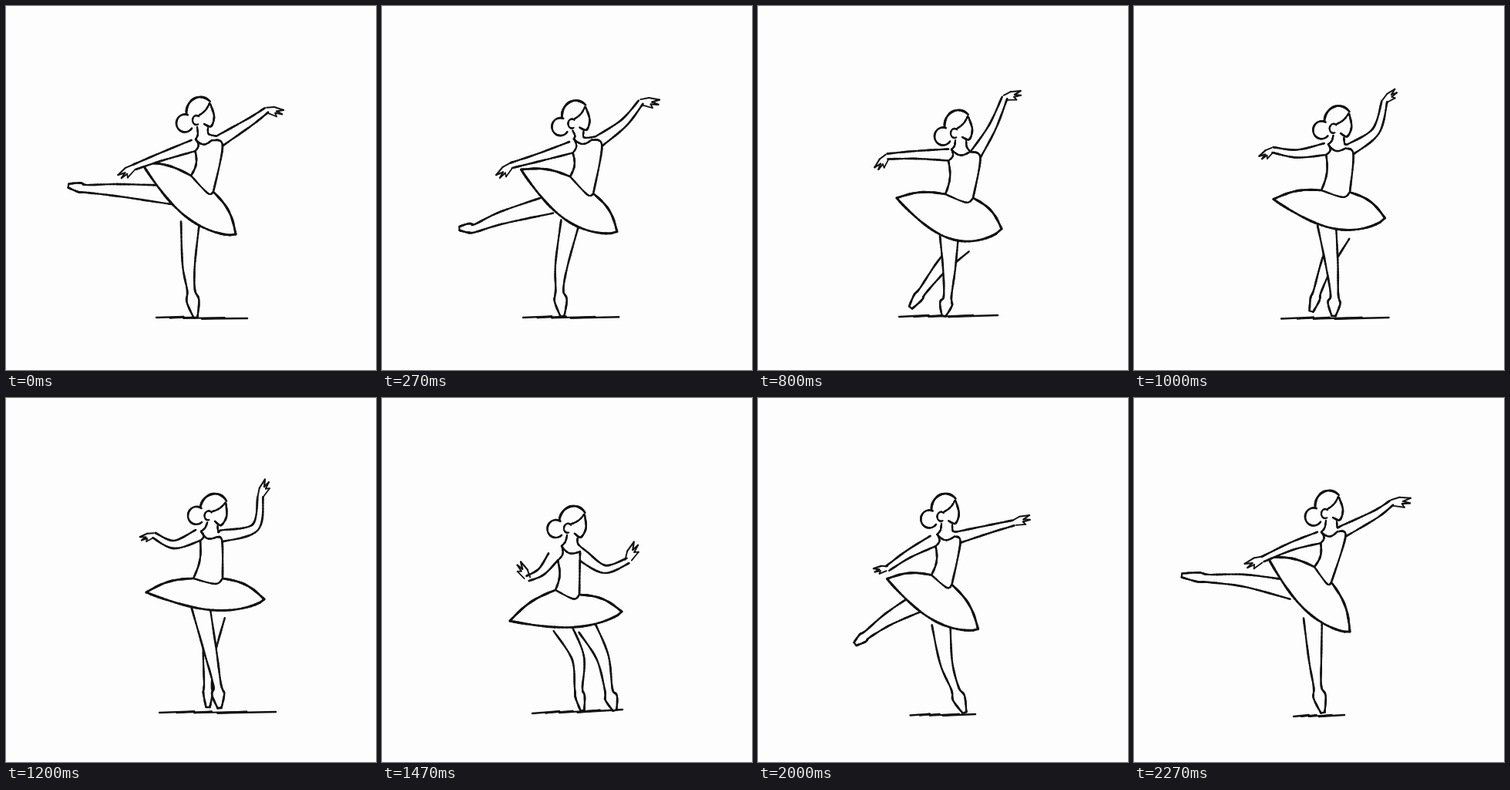
An HTML page with a canvas that plays this animation: 480x472 px, repeating every 2.34 s.

```html
<!DOCTYPE html>
<html lang="en">
<head>
<meta charset="utf-8">
<title>Ballet turn</title>
<style>
html, body { margin: 0; width: 100%; height: 100%; overflow: hidden; background: #fdfdfd; }
canvas { display: block; }
</style>
</head>
<body>
<canvas id="stage" width="480" height="472"></canvas>
<script>
const ctx = document.getElementById('stage').getContext('2d');
const PAPER = '#fdfdfd', INK = '#121212';
const LOOP = 2340, STEP = 1000 / 15;
const keySteps = [0, 7, 12, 18, 22, 26, 34, 35];

// Each joint has one position per key pose.
const keys = text => text.split(' ').map(pair => pair.split(',').map(Number));
const arms = {
  shoulderL: keys('243,181 247,185 247,193 249,178 222,206 214,190 240,181'),
  elbowL: keys('200,196 205,197 205,193 218,190 207,225 185,213 205,192'),
  wristL: keys('166,209 169,205 168,195 192,178 189,234 169,233 167,209'),
  tipL: keys('146,220 151,220 152,210 174,181 179,213 156,228 144,216'),
  shoulderR: keys('277,175 284,176 282,193 279,179 261,205 250,188 271,173'),
  elbowR: keys('317,150 311,153 304,157 323,168 289,222 290,188 313,151'),
  wristR: keys('338,135 334,117 320,119 330,128 319,211 329,188 334,136'),
  tipR: keys('360,136 360,113 341,111 337,106 328,187 346,175 359,131')
};
const legs = {
  hipW: keys('215,245 222,266 265,310 272,283 233,296 206,284 205,249'),
  kneeW: keys('148,239 162,301 238,338 264,328 254,336 194,336 145,237'),
  ankleW: keys('105,237 134,326 214,369 262,370 255,376 187,378 98,234'),
  toeW: keys('81,233 115,330 198,391 262,401 260,405 190,408 62,230'),
  hipS: keys('239,280 248,280 248,298 252,268 266,298 243,301 232,285'),
  kneeS: keys('237,335 230,335 248,340 265,328 286,336 253,345 235,340'),
  ankleS: keys('240,368 223,368 246,376 274,372 294,378 273,379 238,374'),
  toeS: keys('246,404 225,401 241,402 277,402 302,405 291,408 245,408')
};
const body = {
  head: keys('252,138 251,146 260,155 270,144 248,160 233,148 253,140'),
  tilt: keys('0 0 0 15 12 6 0'),
  neckL: keys('246,173 251,172 251,186 253,173 233,192 222,180 243,174'),
  neckR: keys('267,174 276,173 275,189 274,180 257,199 246,186 264,173'),
  waistL: keys('240,220 247,222 243,244 243,234 225,249 216,240 234,219'),
  waistR: keys('269,241 278,245 279,249 281,234 256,255 247,245 256,239')
};
const tutu = {
  left: keys('176,203 184,219 180,249 182,252 166,289 161,262 174,207'),
  right: keys('298,296 310,290 316,289 335,261 311,277 291,296 280,303'),
  sag: keys('21 25 31 18 15 18 18'),
  floorL: keys('195,403 174,403 183,402 199,407 195,408 188,409 207,412'),
  floorR: keys('313,406 303,403 311,402 350,408 312,405 291,410 273,412')
};
const joints = { ...arms, ...legs, ...body, ...tutu };

const mix = (a, b, u) => a.map((v, d) => v + (b[d] - v) * u);
const add = (a, x, y) => [a[0] + x, a[1] + y];
const range = n => Array.from({ length: n + 1 }, (_, i) => i / n);

// Smooth line through points of any dimension.
function curve(pts) {
  const out = [];
  for (let i = 0; i < pts.length - 1; i++) {
    const a = pts[i], b = pts[i + 1], before = pts[i - 1] || a, after = pts[i + 2] || b;
    for (const u of range(12).slice(0, 12)) {
      const v = 1 - u;
      out.push(a.map((p, d) => v * v * (1 + 2 * u) * p + u * u * (3 - 2 * u) * b[d]
        + u * v * (v * (b[d] - before[d]) - u * (after[d] - p)) / 2));
    }
  }
  return [...out, pts[pts.length - 1]];
}

// Line from a to b that bulges to its right; skew moves the bulge towards b.
function bow(a, b, depth, skew = 1, power = 1) {
  const dx = b[0] - a[0], dy = b[1] - a[1], len = Math.hypot(dx, dy);
  return range(28).map(u => {
    const h = depth / len * Math.max(0, Math.sin(Math.PI * u ** skew)) ** power;
    return add(mix(a, b, u), -dy * h, dx * h);
  });
}

function arc(x, y, rx, ry, from, to) {
  return range(24).map(u => {
    const angle = (from + (to - from) * u) * Math.PI / 180;
    return [x + rx * Math.cos(angle), y + ry * Math.sin(angle)];
  });
}

// Both edges of a limb around [x, y, half width] points.
function limb(spine) {
  const mid = curve(spine);
  return [1, -1].map(side => mid.map(([x, y, w], i) => {
    const a = mid[Math.max(0, i - 1)], b = mid[Math.min(mid.length - 1, i + 1)];
    const dx = b[0] - a[0], dy = b[1] - a[1], k = side * w / Math.hypot(dx, dy);
    return [x - dy * k, y + dx * k];
  }));
}

let lineCount = 0;
function ink(pts, width = 2.5) {
  const phase = ++lineCount * 2;
  for (let i = 1; i < pts.length; i++) {
    ctx.lineWidth = width * (1 + .12 * Math.sin(i * .8 + phase));
    ctx.beginPath();
    ctx.moveTo(...pts[i - 1]);
    ctx.lineTo(...pts[i]);
    ctx.stroke();
  }
}

function cover(pts) {
  ctx.beginPath();
  pts.forEach(p => ctx.lineTo(...p));
  ctx.fill();
}

function leg(hip, knee, ankle, toe, heelWidth) {
  const [a, b] = limb([[...hip, 12], [...knee, 8], [...ankle, 5],
    [...mix(ankle, toe, .4), heelWidth], [...toe, 2.5]]);
  const outline = [...a, ...b.reverse()];
  cover(outline);
  ink(outline);
}

// Returns the lower and upper shoulder points.
function arm(shoulder, elbow, wrist, tip, side) {
  const edges = limb([[...shoulder, 7.5], [...elbow, 5], [...wrist, 3.5]]);
  cover([...edges[0], ...edges[1].slice().reverse()]);
  edges.forEach(edge => ink(edge));
  const dx = tip[0] - wrist[0], dy = tip[1] - wrist[1];
  const at = (u, v) => add(wrist, dx * u - dy * v * side, dy * u + dx * v * side);
  ink([at(0, -.15), at(.45, -.2), at(1, -.05), at(.6, .04), at(.92, .2),
    at(.52, .15), at(.6, .35), at(.08, .17)], 2);
  return side > 0 ? [edges[0][0], edges[1][0]] : [edges[1][0], edges[0][0]];
}

function drawHead({ head, tilt, neckL }, shoulderTop) {
  const angle = tilt[0] * Math.PI / 180, c = Math.cos(angle), s = Math.sin(angle);
  const place = pts => pts.map(([x, y]) => add(head, x * c - y * s, x * s + y * c));
  ink(place(arc(0, 0, 18, 20, 172, 315)), 2.9);
  ink(place(bow([12, -12], [-2, 4], -2)), 2.1);
  ink(place(curve([[13, -11], [18, 5], [14, 18], [5, 15]])));
  ink(place(arc(-5, 10, 5, 6, 310, 60)), 2.1);
  ink(place(arc(-20, 14, 11, 11.5, -70, -325)));
  const [nape, throat] = place([[-4, 19], [10, 20]]);
  ink(curve([nape, add(mix(nape, neckL, .6), 2, 0), neckL]), 2.2);
  ink(curve([throat, add(throat, 1, 8), shoulderTop]), 2.2);
}

function draw(ms) {
  const step = Math.min(34, Math.floor((ms % LOOP + 4) / STEP));
  let key = 0;
  while (keySteps[key + 1] <= step) key++;
  const u = (step - keySteps[key]) / (keySteps[key + 1] - keySteps[key]);
  const p = {};
  for (const name in joints) p[name] = mix(joints[name][key], joints[name][(key + 1) % 7], u);

  ctx.fillStyle = PAPER;
  ctx.fillRect(0, 0, 480, 472);
  ctx.strokeStyle = INK;
  ctx.lineCap = ctx.lineJoin = 'round';
  lineCount = 0;

  // Floor scribble runs back and forth.
  ink([0, .3, .15, .45, .3, .75, .5, 1].map((x, i) =>
    add(mix(p.floorL, p.floorR, x), 0, i % 2 ? -1 : 1)), 2.2);
  leg(p.hipW, p.kneeW, p.ankleW, p.toeW, 6);
  leg(p.hipS, p.kneeS, p.ankleS, p.toeS, 8);

  const dip = add(mix(p.waistL, p.waistR, .75), 0, 7);
  const topL = bow(p.left, p.waistL, -5), topR = bow(p.waistR, p.right, -6);
  const hem = bow(p.left, p.right, p.sag[0], 1.3, .7);
  cover([...topL, dip, ...topR, ...hem.slice().reverse()]);
  [topL, topR, hem].forEach(line => ink(line, 2.9));

  const [pitL] = arm(p.shoulderL, p.elbowL, p.wristL, p.tipL, -1);
  const [pitR, topShoulder] = arm(p.shoulderR, p.elbowR, p.wristR, p.tipR, 1);
  ink(bow(pitL, p.waistL, -4));
  ink(curve([p.neckR, pitR, p.waistR]));
  ink(curve([p.waistL, dip, p.waistR]), 2.2);
  ink(bow(p.neckL, p.neckR, 6), 2.2);
  ink(bow(p.neckL, pitL, -4), 2.1);
  drawHead(p, topShoulder);
}

const start = performance.now();
function tick() {
  draw(performance.now() - start);
  requestAnimationFrame(tick);
}
tick();
</script>
</body>
</html>
```
